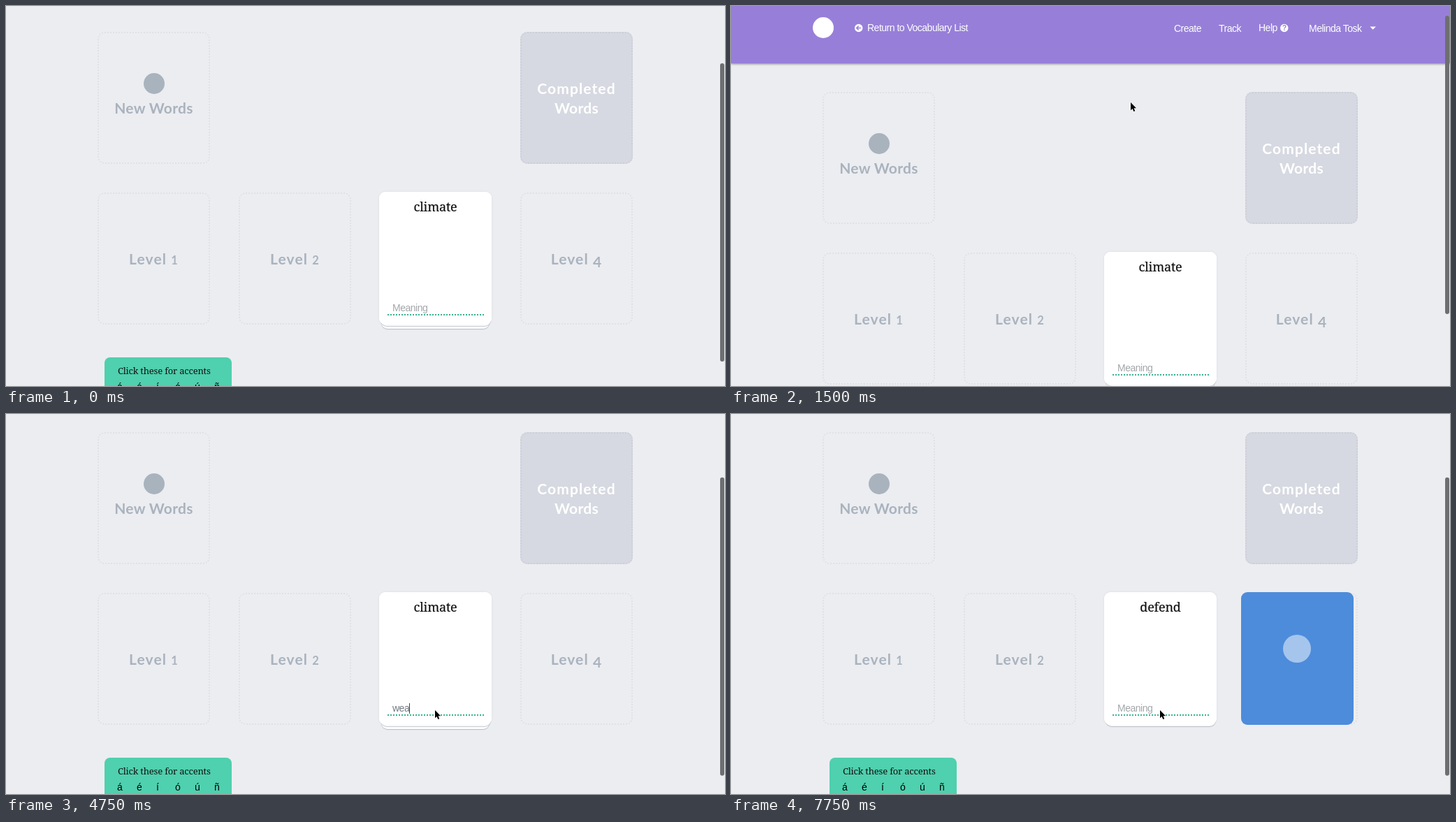
Animation, 1029 px wide and 544 px high, one loop 8 s. Source, as an HTML page:

```html
<!DOCTYPE html>
<html lang="en">
<head>
<meta charset="utf-8">
<title>Vocabulary cards</title>
<style>
html, body { margin: 0; width: 100%; height: 100%; overflow: hidden; background: #ecedf1; }
#stage {
  --s: 86;
  position: relative; width: 1029px; height: 544px; overflow: hidden;
  background: #ecedf1; animation: scroll 8s step-end infinite;
}
#stage * { box-sizing: border-box; }
#page { position: absolute; inset: 0; transform: translateY(calc(var(--s) * -1px)); }
#bar {
  position: absolute; left: 1022px; top: 14px; width: 6px; height: 427px; border-radius: 3px;
  background: #6d6e71; transform: translateY(calc(var(--s) * .79px));
}
svg { position: absolute; overflow: visible; }

/* Text is placed by its vertical centre */
.t { position: absolute; line-height: 20px; margin-top: -10px; white-space: nowrap; }
.sans { font: 14px/20px "Liberation Sans", Arial, sans-serif; letter-spacing: -.5px; }
.slab { font-family: "Noto Serif", serif; color: #111; }
.dot { position: absolute; border-radius: 50%; }

header {
  position: absolute; left: 0; top: 0; width: 1029px; height: 82px;
  background: #977fd9; box-shadow: 0 1px 3px rgba(0,0,0,.45); color: #fff;
}

.slot {
  position: absolute; width: 161px; height: 189px; border: 2px dotted #dfe1e6; border-radius: 10px;
}
.slot .t {
  left: -2px; width: 161px; text-align: center; color: #a9b3be;
  font: bold 21px/20px Lato, sans-serif; letter-spacing: 1.1px;
}
.slot small { font-size: 16.5px; }
.slot .drop { position: relative; top: 4px; }
.slot.done { background: #d6d9e1; border-color: #cccfd8; }
.slot.done .t { color: #fff; }

.card, .layer, .face { position: absolute; background: #fff; border-radius: 9px; }
.card, .flip { position: absolute; left: 534px; top: 352px; width: 161px; height: 190px; }
.face { inset: 0; backface-visibility: hidden; }
.card { box-shadow: 0 0 3px rgba(80,95,115,.12); }
.layer { height: 40px; box-shadow: 0 1px 1px rgba(80,100,120,.35); }
.last { animation: last 8s step-end infinite; }
.word {
  left: 0; width: 161px; top: 21px; text-align: center; font-size: 18px; letter-spacing: -.2px;
  -webkit-text-stroke: .2px;
}
.field {
  position: absolute; left: 12px; top: 157px; width: 138px; height: 20px; padding-left: 7px;
  display: flex; align-items: center; color: #737a82; border-bottom: 2px dotted #36b38f;
}
.hint { position: absolute; left: 7px; color: #a3a6aa; }
.front .hint { animation: hint 8s step-end infinite; }
.typed::before { content: ""; animation: type 8s step-end infinite; }
.caret { width: 1px; height: 15px; background: #444; opacity: 0; animation: caret 8s step-end infinite; }

.flip { transform-style: preserve-3d; animation: flip 8s step-end infinite; }
.back { background: #4d8cdb; transform: rotateY(180deg); }
.win { opacity: 0; animation: win 8s step-end infinite; }
.glow { position: absolute; inset: -1px; border: 2px solid #aee0d1; border-radius: 10px; box-shadow: 0 0 2px #bfe3d9; }
.photo {
  position: absolute; left: 26px; top: 45px; width: 110px; height: 67px;
  background:
    radial-gradient(circle at 40% 58%, #fff08a 0 2px, rgba(255,200,30,.9) 6px, rgba(255,165,10,0) 18px),
    radial-gradient(ellipse at 88% 50%, #6b2a06 6%, rgba(120,48,4,0) 24%),
    radial-gradient(ellipse at 62% 46%, rgba(125,50,4,.85), rgba(150,60,0,0) 18%),
    radial-gradient(ellipse at 70% 20%, rgba(255,165,10,.9), rgba(245,145,0,0) 30%),
    radial-gradient(ellipse at 10% 16%, rgba(145,60,0,.8), rgba(170,75,0,0) 34%),
    radial-gradient(ellipse at 6% 96%, #5e2204, rgba(110,40,0,0) 36%),
    radial-gradient(ellipse at 96% 98%, #6b2805, rgba(120,45,0,0) 34%),
    linear-gradient(#cf6800, #ea8200 32%, #d96a00 52%, #ee8a04 70%, #b24c02);
}
.msg {
  position: absolute; left: 314px; top: 239px; width: 400px; text-align: center;
  font: 21.5px/32px "Noto Serif", serif; color: #434b58; -webkit-text-stroke: .45px;
}
.msg b { font-weight: inherit; color: #43b897; }
.arrow { animation: nudge 8s step-end infinite; }

.accents {
  position: absolute; left: 141px; top: 589px; width: 182px; height: 70px;
  background: #4fd0ae; border-radius: 8px;
}
.cursor { left: 0; top: 0; opacity: 0; animation: cursor 8s step-end infinite; }

@keyframes scroll {
  0% { --s: 86; }
  6.25% { --s: 70; }
  9.375% { --s: 38; }
  12.5% { --s: 14; }
  15.625% { --s: 4; }
  18.75% { --s: 0; }
  21.875% { --s: 14; }
  25% { --s: 52; }
  28.125% { --s: 84; }
  31.25%, 100% { --s: 97; }
}
@keyframes cursor {
  0% { opacity: 0; transform: translate(572px, 138px); }
  6.25% { opacity: 1; transform: translate(572px, 138px); }
  28.125% { opacity: 1; transform: translate(580px, 206px); }
  31.25% { opacity: 1; transform: translate(608px, 369px); }
  34.375%, 100% { opacity: 1; transform: translate(614px, 424px); }
}
@keyframes caret {
  0%, 40.625%, 75%, 87.5%, 100% { opacity: 0; }
  34.375%, 46.875%, 81.25% { opacity: 1; }
}
@keyframes type {
  0% { content: ""; }
  53.125% { content: "w"; }
  56.25% { content: "we"; }
  59.375% { content: "wea"; }
  62.5% { content: "weat"; }
  65.625% { content: "weathe"; }
  68.75%, 100% { content: "weather"; }
}
@keyframes hint { 0% { opacity: 1; } 53.125%, 100% { opacity: 0; } }
@keyframes win {
  0%, 87.5%, 100% { opacity: 0; }
  68.75% { opacity: .5; }
  71.875% { opacity: 1; }
}
@keyframes nudge {
  0%, 75%, 84.375%, 100% { transform: none; }
  71.875%, 81.25% { transform: translateX(-4px); }
  78.125% { transform: translateX(3px); }
}
@keyframes last { 0% { opacity: 1; } 87.5%, 100% { opacity: 0; } }
@keyframes flip {
  0% { transform: none; }
  87.5% { transform: perspective(900px) translateX(28px) rotateY(35deg); }
  90.625% { transform: perspective(900px) translateX(105px) rotateY(118deg); }
  93.75% { transform: perspective(900px) translateX(172px) rotateY(166deg); }
  96.875%, 100% { transform: translateX(196px) rotateY(180deg); }
}
</style>
</head>
<body>
<div id="stage">
  <div id="page">
    <header class="sans">
      <i class="dot" style="left:117px;top:16px;width:30px;height:30px;background:#fff"></i>
      <svg width="1029" height="82" fill="#fff">
        <circle cx="182.700" cy="31.500" r="5.700"/>
        <path d="M186 31.500H180M182.700 28.500L179.700 31.500L182.700 34.500" fill="none" stroke="#977fd9" stroke-width="1.600"/>
        <circle cx="791.800" cy="31.500" r="5.700"/>
        <path d="M914.500 29.500H923L918.700 33.700Z"/>
        <text x="789" y="35" font-size="10" font-weight="bold" fill="#977fd9">?</text>
      </svg>
      <span class="t" style="left:195px;top:31px">Return to Vocabulary List</span>
      <span class="t" style="left:634px;top:32px">Create</span>
      <span class="t" style="left:698px;top:32px">Track</span>
      <span class="t" style="left:755px;top:31px">Help</span>
      <span class="t" style="left:827px;top:32px">Melinda Tosk</span>
    </header>

    <div class="slot" style="left:131px;top:123px">
      <i class="dot" style="left:64px;top:57px;width:30px;height:30px;background:#a9b3be"></i>
      <span class="t" style="top:107px;letter-spacing:.3px">New Words</span>
    </div>
    <div class="slot done" style="left:736px;top:123px">
      <span class="t" style="top:79px">Completed</span>
      <span class="t" style="top:107px;letter-spacing:.3px">Words</span>
    </div>
    <div class="slot" style="left:131px;top:352.500px"><span class="t" style="top:93px">Level <small>1</small></span></div>
    <div class="slot" style="left:333px;top:352.500px"><span class="t" style="top:93px">Level <small>2</small></span></div>
    <div class="slot" style="left:736px;top:352.500px"><span class="t" style="top:93px">Level <span class="drop">4</span></span></div>

    <div class="layer last" style="left:537px;top:508px;width:155px"></div>
    <div class="layer" style="left:535.500px;top:504px;width:158px"></div>
    <div class="card">
      <span class="t slab word">defend</span>
      <div class="field sans"><span class="hint">Meaning</span></div>
    </div>

    <div class="flip">
      <div class="face front">
        <span class="t slab word">climate</span>
        <div class="win"><i class="glow"></i><i class="photo"></i></div>
        <div class="field sans">
          <span class="hint">Meaning</span><span class="typed"></span><i class="caret"></i>
        </div>
      </div>
      <div class="face back">
        <i class="dot" style="left:60px;top:61px;width:40px;height:40px;background:#a6c5ed"></i>
      </div>
    </div>

    <div class="win">
      <div class="msg"><b>Success!</b> Click card or press ENTER<br>to advance!</div>
      <svg style="left:0;top:0" width="1029" height="640" fill="none" stroke-linecap="round" stroke-linejoin="round">
        <circle cx="695.500" cy="352.500" r="16.200" fill="#43b897"/>
        <path d="M689 353L693.500 357.500L702 348" stroke="#fff" stroke-width="4.500"/>
        <path class="arrow" d="M686.500 447.500H718M706.500 436L719 447.500L706.500 459.500" stroke="#977fd9" stroke-width="7.500"/>
      </svg>
    </div>

    <div class="accents">
      <span class="t slab" style="left:19px;top:19px;font-size:13px;letter-spacing:-.2px">Click these for accents</span>
      <span class="t sans" style="left:18px;top:42px">á</span>
      <span class="t sans" style="left:46px;top:42px">é</span>
      <span class="t sans" style="left:74px;top:42px">í</span>
      <span class="t sans" style="left:101px;top:42px">ó</span>
      <span class="t sans" style="left:129px;top:42px">ú</span>
      <span class="t sans" style="left:157px;top:42px">ñ</span>
    </div>
  </div>
  <div id="bar"></div>
  <svg class="cursor" width="8" height="14" viewBox="0 0 9.300 16">
    <path d="M0 0V13L3 10.200L5 15L7.300 14L5.300 9.400H9.300Z" fill="#000" stroke="#fff" stroke-width="1" paint-order="stroke"/>
  </svg>
</div>
</body>
</html>
```
